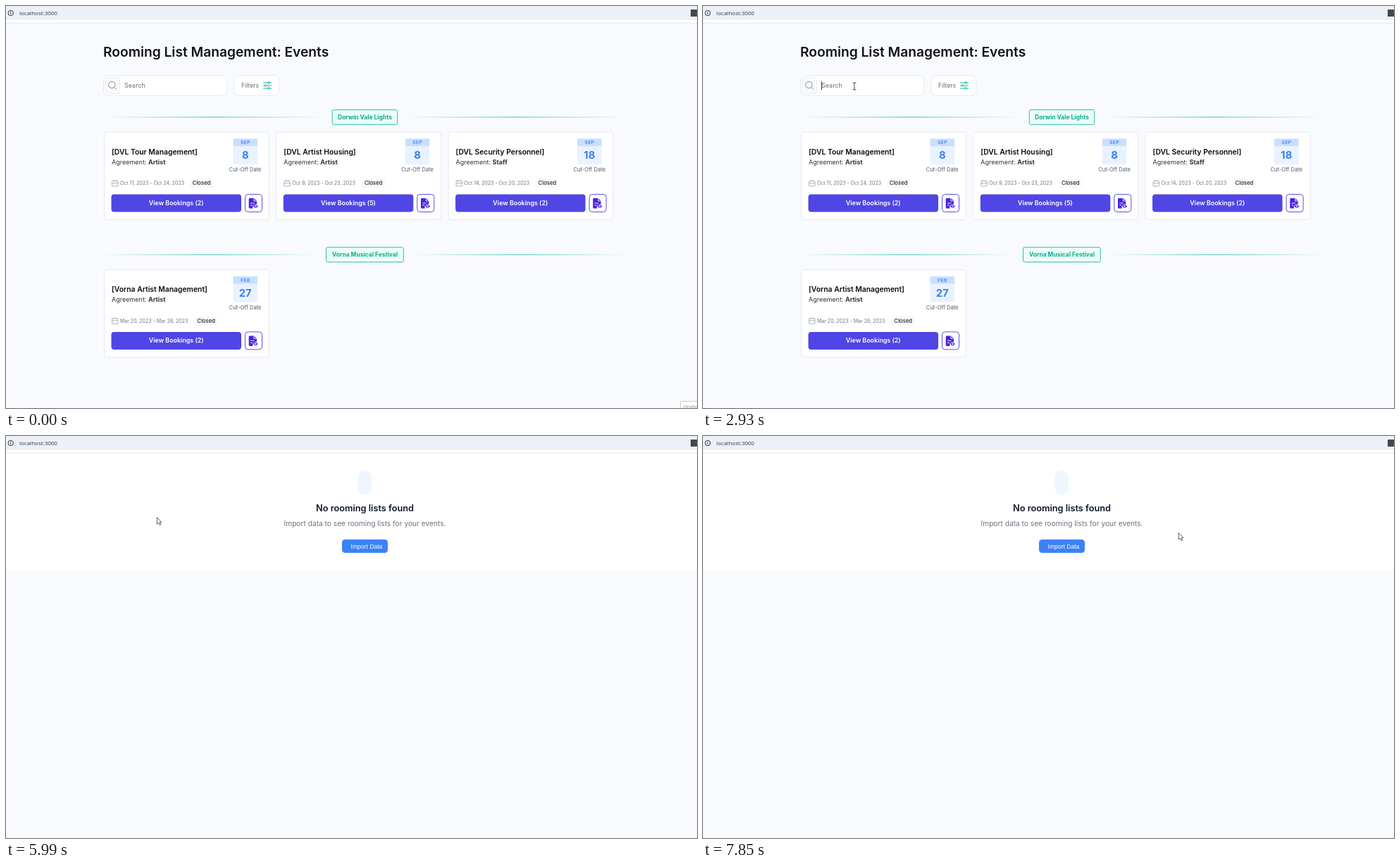
These frames come from a looping animation (981 by 571 pixels, 8 s). An HTML page:

```html
<!DOCTYPE html>
<html lang="en">
<head>
<meta charset="utf-8">
<title>Rooming lists</title>
<style>
html, body { margin: 0; width: 100%; height: 100%; overflow: hidden; background: #fafbff; }
svg { display: block; width: 981px; height: 571px; font-family: Inter, "Open Sans", sans-serif; }
text { white-space: pre; }
</style>
</head>
<body>
<svg id="stage" viewBox="0 0 981 571" xmlns="http://www.w3.org/2000/svg">
  <defs>
    <linearGradient id="fade">
      <stop offset="0" stop-color="#14b8a6" stop-opacity="0"/>
      <stop offset=".5" stop-color="#14b8a6" stop-opacity=".85"/>
      <stop offset="1" stop-color="#14b8a6" stop-opacity="0"/>
    </linearGradient>
    <clipPath id="picked"><rect id="clipA"/><rect id="clipB"/></clipPath>
  </defs>
</svg>
<script>
const NS = 'http://www.w3.org/2000/svg';
const stage = document.getElementById('stage');
const byId = id => document.getElementById(id);

function add(parent, tag, attrs, str) {
  const el = document.createElementNS(NS, tag);
  set(el, attrs);
  if (str !== undefined) el.textContent = str;
  parent.appendChild(el);
  return el;
}
function set(el, attrs) {
  for (const k in attrs) el.setAttribute(k, attrs[k]);
}
const group = (p, attrs = {}) => add(p, 'g', attrs);
const box = (p, x, y, width, height, fill, rx = 0, stroke = 'none') =>
  add(p, 'rect', { x, y, width, height, fill, rx, stroke });
const path = (p, d, stroke, width = 1, fill = 'none') =>
  add(p, 'path', { d, stroke, 'stroke-width': width, fill });
const label = (p, x, y, size, weight, fill, str, anchor = 'start', extra = {}) =>
  add(p, 'text', { x, y, 'font-size': size, 'font-weight': weight, fill, 'text-anchor': anchor, ...extra }, str);
const show = (el, on) => el.setAttribute('visibility', on ? 'visible' : 'hidden');

// Page views
const list = group(stage), loading = group(stage), empty = group(stage);

function drawSection(y, left, right, name) {
  box(list, 138, y - 0.5, left - 13 - 138, 1, 'url(#fade)');
  box(list, right + 12, y - 0.5, 880 - right - 12, 1, 'url(#fade)');
  box(list, left, y - 10.5, right - left, 21, '#ecfdf8', 2, '#2cc0ab');
  label(list, 509.5, y + 3, 8.45, 700, '#10ab95', name, 'middle');
}

function drawCard(x, y, c) {
  const g = group(list, { transform: `translate(${x} ${y})` });
  box(g, 0.5, 0, 234, 124.5, '#fff', 4, '#e3e8f2');
  label(g, 11, 31.5, 10.35, 600, '#0b0b0f', `[${c.name}]`);
  const who = label(g, 11, 45.5, 9, 400, '#333', 'Agreement: ');
  add(who, 'tspan', { 'font-weight': 700 }, c.who);

  box(g, 183.5, 9.5, 34.5, 36.5, '#e9f2ff', 1.5);
  box(g, 183.5, 9.5, 34.5, 10.5, '#c9dffe', 1.5);
  label(g, 201, 17.2, 6.5, 600, '#3b82f6', c.month, 'middle', { 'letter-spacing': 0.5 });
  label(g, 200.7, 38.3, 14.8, 700, '#3b7ff0', c.day, 'middle');
  label(g, 200.7, 56.2, 7.6, 400, '#525c6c', 'Cut-Off Date', 'middle');

  path(g, 'M12.5 69.5h6.5q1 0 1 1v5.5q0 1-1 1h-6.5q-1 0-1-1v-5.5q0-1 1-1zM11.5 72.5h8.5M13.8 68v2M17.8 68v2', '#9a9fa8', 0.8);
  label(g, 23, 75.2, 7, 400, '#6b7280', c.dates);
  box(g, c.chip - 4, 66.5, 33.5, 12.5, '#f7f9fb', 3);
  label(g, c.chip, 75.4, 7.7, 500, '#20242c', 'Closed');

  box(g, 10.5, 88.5, 184.5, 25, '#4f46e5', 4);
  label(g, 102.7, 104.1, 8.9, 600, '#fff', `View Bookings (${c.count})`, 'middle');
  box(g, 200.5, 88.5, 24, 25, '#fff', 4, '#5a50e2');
  path(g, 'M207 94h6l4 4v4.5q-5 .3-6 4.5l.8 1.5H207q-1.3 0-1.3-1.3V95.3q0-1.3 1.3-1.3z', 'none', 0, '#4a22e0');
  path(g, 'M208 101h5.5M208 104h3M213 94.5v3.5h3.5', '#fff', 0.9);
  path(g, 'M211.8 105.5q3.6-5 7.2 0q-3.6 5-7.2 0z', '#fff', 0.6, '#4a22e0');
  add(g, 'circle', { cx: 215.4, cy: 105.5, r: 1.1, fill: '#fff' });
}

box(list, 0, 0, 981, 571, '#f8fafd');
label(list, 138, 71.7, 19.2, 600, '#111317', 'Rooming List Management: Events');
box(list, 138.5, 98.5, 175, 29, '#fff', 7, '#e4e9f1');
box(list, 141.5, 101.5, 20, 23, '#f9fafc', 4, '#e6eaf1');
path(list, 'M155 112a4.7 4.7 0 1 1-9.4 0a4.7 4.7 0 1 1 9.4 0M153.7 115.4l3.1 3.1', '#777c85', 0.9);
const query = label(list, 168, 116.3, 9, 400, '#6c7078', 'Search');
const caret = box(list, 168, 107, 1, 12, '#333');
box(list, 324, 98.5, 64, 29, '#fff', 7, '#e4e9f1');
label(list, 334, 116.3, 8.7, 400, '#666c76', 'Filters');
for (const [y, x] of [[109, 373], [113, 368.5], [117, 373]]) {
  path(list, `M365 ${y}h12`, '#14b8a6', 1);
  add(list, 'circle', { cx: x, cy: y, r: 1.4, fill: '#fff', stroke: '#14b8a6', 'stroke-width': 1 });
}

drawSection(157.9, 463.2, 555.7, 'Dorwin Vale Lights');
drawSection(353.2, 454.5, 564.3, 'Vorna Musical Festival');
drawCard(139, 179, { name: 'DVL Tour Management', who: 'Artist', month: 'SEP', day: 8, dates: 'Oct 11, 2023 - Oct 24, 2023', chip: 125.8, count: 2 });
drawCard(383.3, 179, { name: 'DVL Artist Housing', who: 'Artist', month: 'SEP', day: 8, dates: 'Oct 9, 2023 - Oct 23, 2023', chip: 125.6, count: 5 });
drawCard(627.6, 179, { name: 'DVL Security Personnel', who: 'Staff', month: 'SEP', day: 18, dates: 'Oct 14, 2023 - Oct 20, 2023', chip: 128, count: 2 });
drawCard(139, 374.4, { name: 'Vorna Artist Management', who: 'Artist', month: 'FEB', day: 27, dates: 'Mar 20, 2023 - Mar 26, 2023', chip: 132.3, count: 2 });

const tip = group(list);
box(tip, 957.5, 561.5, 40, 20, '#fff', 0, '#c9ccd1');
label(tip, 961, 573, 7.5, 400, '#8b8f96', 'Grabar', 'start', { 'font-style': 'italic' });

box(loading, 0, 0, 981, 571, '#fafbff');
path(loading, 'M490 90a19.5 19.5 0 0 1 39 0a19.5 17 0 0 0-39 0z', 'none', 0, '#3b82f6');
path(loading, 'M509.5 75.5a14.5 14.5 0 0 1 0 29a12.5 14.5 0 0 0 0-29z', 'none', 0, '#93c5fd');
label(loading, 509.5, 131.5, 11.4, 500, '#555d6c', 'Loading rooming lists...', 'middle');

box(empty, 0, 0, 981, 571, '#fafbff');
box(empty, 0, 24, 981, 166, '#fff');
box(empty, 499.5, 49, 19.5, 34.5, '#eff6ff', 9.75);
const copy = (p, head, body) => {
  label(p, 509.5, 107, 12.75, 600, head, 'No rooming lists found', 'middle');
  label(p, 509.5, 128, 10.2, 400, body, 'Import data to see rooming lists for your events.', 'middle');
};
copy(empty, '#0f172a', '#6b7280');
const picked = group(empty, { 'clip-path': 'url(#picked)' });
box(picked, 380, 90, 260, 46, '#3367d1');
copy(picked, '#fff', '#fff');
box(empty, 477, 147, 65, 19, '#3b82f6', 4.5);
label(empty, 489.5, 159.6, 8.6, 400, '#fff', 'Import Data', 'start', { 'font-family': '"Liberation Sans", sans-serif' });

// Browser bar
box(stage, 0, 0, 981, 20, '#ecf1f9');
box(stage, 0, 20, 981, 4, '#fff');
box(stage, 0, 23.7, 981, 1, '#e2e7ee');
add(stage, 'circle', { cx: 6.7, cy: 10, r: 3.7, fill: 'none', stroke: '#30343a', 'stroke-width': 1 });
path(stage, 'M6.7 9.4v2.6M6.7 7.7v1', '#30343a', 1);
label(stage, 19, 13, 8, 400, '#33373d', 'localhost:3000', 'start', { 'font-family': '"Open Sans", sans-serif' });
box(stage, 972, 5, 9, 10, '#45484d');

// Pointer
const pointer = group(stage);
const glow = add(pointer, 'circle', { r: 6.3, fill: '#f6ee3c', opacity: 0.75 });
const arrow = path(pointer, 'M.4 .5V10.3L2.7 8.2 4.3 11.7 5.8 11 4.3 7.6H7z', '#41454b', 0.85, '#fff');
const beam = path(pointer, 'M-2.4-5h1.6q.8 0 .8.8v8.4q0 .8-.8.8h-1.6M2.4-5H.8q-.8 0-.8.8M2.4 5H.8q-.8 0-.8-.8', '#2d3035', 0.9);

const ease = u => u * u * (3 - 2 * u);
const sweep = Array.from({ length: 13 }, (_, i) => {
  const u = ease((i + 1) / 13);
  return [655 - 440 * u, 419 - 305 * u];
});
// Each move: start, end, places visited at even steps
const moves = [
  [260, 590, [[904, 560], [826, 515], [748, 470], [680, 432], [630, 410], [655, 419]]],
  [790, 1590, sweep],
  [4730, 4800, [[214, 114], [214, 114]]],
  [5990, 6520, [[214, 115], [222, 124], [245, 135], [280, 138], [320, 130], [360, 115], [395, 102], [415, 97], [421, 99]]],
  [6660, 7250, [[421, 99], [424, 100], [436, 101], [462, 103], [502, 106], [541, 109], [578, 114], [617, 121], [650, 127], [667, 129]]],
  [7450, 7850, [[667, 129], [669, 131], [673, 135], [675, 137], [675, 137], [675, 137]]]
];
function pointAt(t) {
  const m = moves.filter(v => t >= v[0]).pop();
  if (!m) return null;
  const last = m[2].length - 1;
  return m[2][Math.min(last, Math.floor((t - m[0]) / (m[1] - m[0]) * last + 0.01))];
}
const between = (t, a, b) => t >= a && t < b;
const keys = [3270, 3540, 3800, 4000, 4200];

function drawSearch(t) {
  const n = keys.filter(k => t >= k).length;
  query.textContent = n ? 'z'.repeat(n) : 'Search';
  query.setAttribute('font-family', n ? 'Lato, sans-serif' : 'Inter, sans-serif');
  caret.setAttribute('x', n ? 167 + 4 * n : 168);
  show(caret, t < 4730 && (between(t, 1800, 2400) || t >= 2930));
}

function drawPick(t, p) {
  const on = between(t, 6660, 7690) && p[0] > 452;
  show(picked, on);
  if (!on) return;
  const second = p[1] > 113;
  set(byId('clipA'), { x: 440, y: 93.5, width: second ? 142 : p[0] - 452, height: 18 });
  set(byId('clipB'), { x: 393, y: 116, width: second ? Math.min(p[0], 627) - 393 : 0, height: 16 });
}

function draw(t) {
  show(list, t < 4730);
  show(loading, between(t, 4730, 4800));
  show(empty, t >= 4800);
  show(tip, t < 70);
  drawSearch(t);

  const p = pointAt(t);
  show(pointer, !!p);
  show(picked, false);
  if (!p) {
    [glow, arrow, beam].forEach(el => show(el, false));
    return;
  }
  const [x, y] = p;
  const text = t < 4730
    ? x < 314 && between(y, 98, 128)
    : t >= 4800 && (between(x, 440, 580) && between(y, 93, 113) || between(x, 393, 627) && between(y, 113, 134));
  pointer.setAttribute('transform', `translate(${x} ${y})`);
  show(arrow, !text);
  show(beam, text);
  show(glow, between(t, 1800, 1870) || between(t, 6660, 7450) || between(t, 7690, 7850));
  if (t >= 4800) drawPick(t, p);
}

const begin = performance.now();
function tick() {
  draw((performance.now() - begin) % 8000);
  requestAnimationFrame(tick);
}
draw(0);
tick();
</script>
</body>
</html>
```
